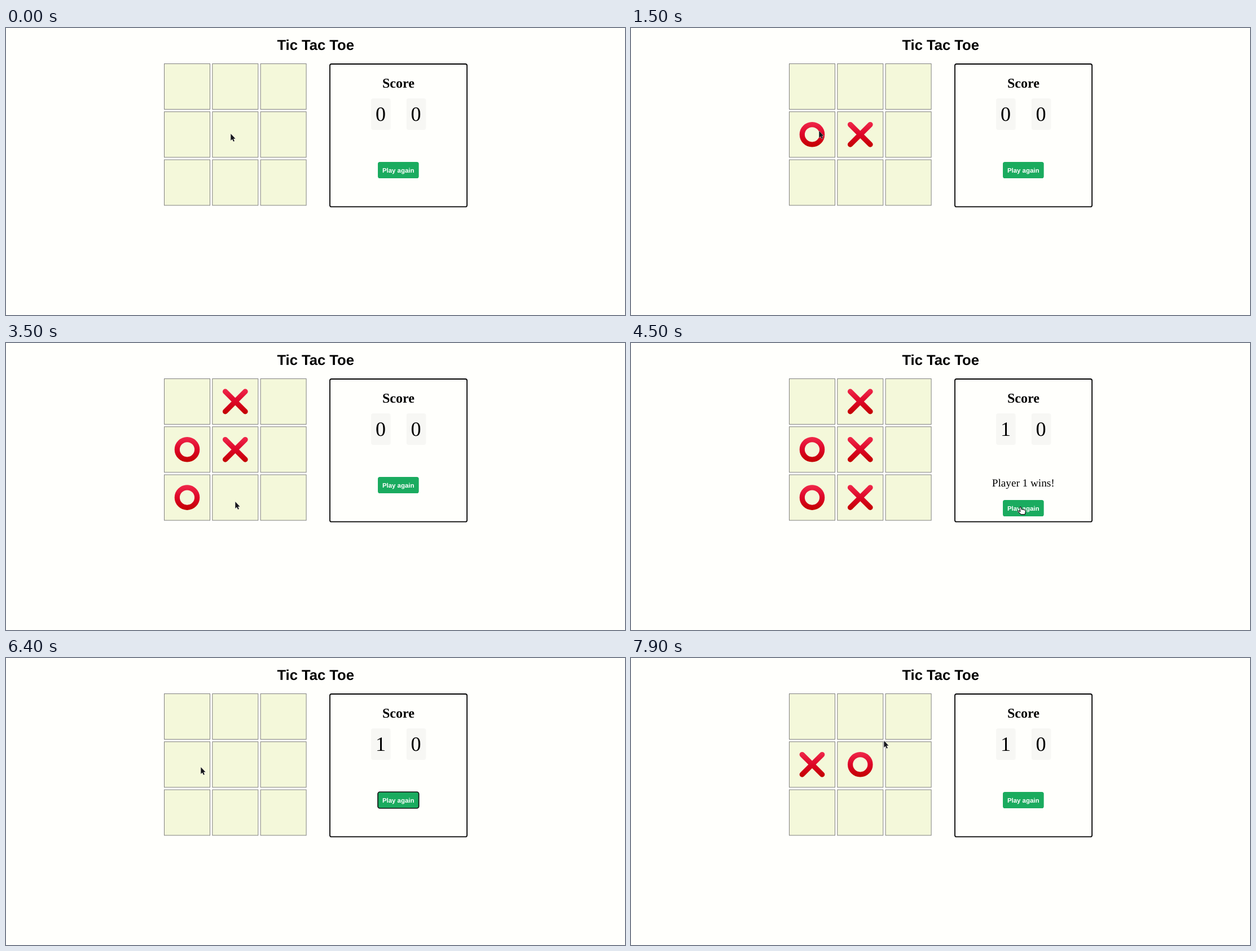
An HTML page that plays this animation: 1097x510 px, repeating every 8000 ms.

```html
<!DOCTYPE html>
<html lang="en">
<head>
<meta charset="utf-8">
<title>Tic Tac Toe</title>
<style>
html, body { margin: 0; width: 100%; height: 100%; overflow: hidden; background: #fffffc; }
svg { display: block; position: absolute; left: 0; top: 0; }
text { text-anchor: middle; text-rendering: geometricPrecision; }
.sans { font-family: "Liberation Sans", Arial, sans-serif; font-weight: bold; }
.serif { font-family: "Liberation Serif", "Times New Roman", serif; }
.cell { fill: #f4f8da; stroke: #808080; }
.chip { fill: #f7f7f4; }
#face { fill: #1aab5f; }
.focus #face { stroke: #101010; stroke-width: 1.7; }
</style>
</head>
<body>
<svg width="1097" height="510" viewBox="0 0 1097 510">
  <defs>
    <linearGradient id="red" gradientUnits="userSpaceOnUse" x1="0" y1="-23" x2="0" y2="23">
      <stop offset="0" stop-color="#f02a4c"/>
      <stop offset=".5" stop-color="#dd0527"/>
      <stop offset="1" stop-color="#c20000"/>
    </linearGradient>
    <path id="X" fill="none" stroke="url(#red)" stroke-width="9.4" stroke-linecap="round"
      d="M-17.7-17.7 17.7 17.7M17.7-17.7-17.7 17.7"/>
    <circle id="O" r="17.7" fill="none" stroke="url(#red)" stroke-width="9.2"/>
  </defs>
  <text class="sans" x="548.7" y="39" font-size="25.6">Tic Tac Toe</text>
  <g id="board"></g>
  <rect x="574" y="64" width="243" height="253.7" rx="2.8" fill="none" stroke="#000" stroke-width="1.8"/>
  <text class="serif" x="695.4" y="106" font-size="24" font-weight="bold">Score</text>
  <rect class="chip" x="647" y="125" width="34.6" height="56" rx="4"/>
  <rect class="chip" x="709.7" y="125" width="34.6" height="56" rx="4"/>
  <g class="serif" font-size="36">
    <text id="score" x="664.1" y="165">0</text>
    <text x="726.6" y="165">0</text>
  </g>
  <text id="win" class="serif" x="695.2" y="255" font-size="19.2">Player 1 wins!</text>
  <g id="button">
    <rect id="face" x="659" y="238" width="72.6" height="29" rx="3.6"/>
    <text class="sans" x="695.2" y="256.7" font-size="11.4" fill="#fff">Play again</text>
  </g>
  <g id="cursor">
    <path id="arrow" d="M.3 0V12L3 9.6 5 13.8 6.9 12.9 5 8.8H8.6Z" fill="#16161c"
      stroke="#fff" stroke-opacity=".8" paint-order="stroke"/>
    <path id="hand" d="M-1 1.2Q0-.6 1.3 1L2.4 5Q3.6 3.8 4.6 5.2 6 4.2 6.9 5.8 8.6 5.2 9 7.2 9.6 9.4 8.6 11.2L8.2 13.6H1.4L-1.2 11.4-4.2 8.6Q-4.6 6.8-2.6 7.2L-.2 8.8Z"
      fill="#fff" stroke="#111" stroke-width="1.1" stroke-linejoin="round"/>
  </g>
</svg>
<script>
const LOOP = 8000, STEP = 100;
const LEFT = 280, TOP = 63, PITCH = 85.3, SIZE = 82;
const WIN = 3900, RESET = 4800;
const rounds = [
  { clicks: [800, 1500, 2300, 2900, WIN], end: RESET },
  { clicks: [6900, 7600], end: LOOP }
];

// pointer glides: begin, end, x, y
const home = [398, 188];
const glides = [
  [200, 600, 404, 188], [800, 1300, 333, 183], [1500, 1800, 361, 147],
  [1900, 2200, 389, 113], [2300, 2700, 339, 246], [2900, 3500, 406, 282],
  [WIN, 4500, 690, 291], [5100, 5600, 474, 235], [5600, 6400, 345, 194],
  [6400, 6600, 339, 195], [7100, 7500, 404, 187], [7600, 7900, 448, 147]
];

const $ = id => document.getElementById(id);
const show = (el, on) => el.setAttribute("visibility", on ? "visible" : "hidden");
const move = (el, x, y) => el.setAttribute("transform", `translate(${x} ${y})`);
const easeOut = u => 1 - (1 - u) ** 1.5;

function add(tag, attrs) {
  const el = document.createElementNS("http://www.w3.org/2000/svg", tag);
  for (const k in attrs) el.setAttribute(k, attrs[k]);
  return $("board").appendChild(el);
}

function pointer(t) {
  let [x, y] = home;
  for (const [begin, end, toX, toY] of glides) {
    if (t <= begin) break;
    const k = easeOut(Math.min(1, (t - begin) / (end - begin)));
    x += (toX - x) * k;
    y += (toY - y) * k;
  }
  return [Math.round(x), Math.round(y)];
}

for (let i = 0; i < 9; i++)
  add("rect", {
    class: "cell", width: SIZE - 1, height: SIZE - 1,
    x: LEFT + .5 + i % 3 * PITCH, y: TOP + .5 + Math.floor(i / 3) * PITCH
  });

// each click marks the cell under the pointer, X and O in turn
const marks = rounds.flatMap(({ clicks, end }) => clicks.map((on, i) => {
  const [x, y] = pointer(on);
  const el = add("use", { href: i % 2 ? "#O" : "#X" });
  const centre = (p, from) => from + SIZE / 2 + Math.floor((p - from) / PITCH) * PITCH;
  move(el, centre(x, LEFT), centre(y, TOP));
  return { el, on, end };
}));

function draw(now) {
  const t = Math.floor(now % LOOP / STEP) * STEP;
  const won = t >= WIN && t < RESET;
  const drop = won ? 41 : 0;
  const [x, y] = pointer(t);
  const over = x >= 659 && x < 732 && y >= 238 + drop && y < 267 + drop;

  for (const { el, on, end } of marks) show(el, t >= on && t < end);
  $("score").textContent = t >= WIN ? 1 : 0;
  show($("win"), won);
  $("button").classList.toggle("focus", t >= RESET && t < rounds[1].clicks[0]);
  move($("button"), 0, drop);
  move($("cursor"), x, y);
  show($("arrow"), !over);
  show($("hand"), over);
}

const start = performance.now();
function tick() {
  draw(performance.now() - start);
  requestAnimationFrame(tick);
}
tick();
</script>
</body>
</html>
```
